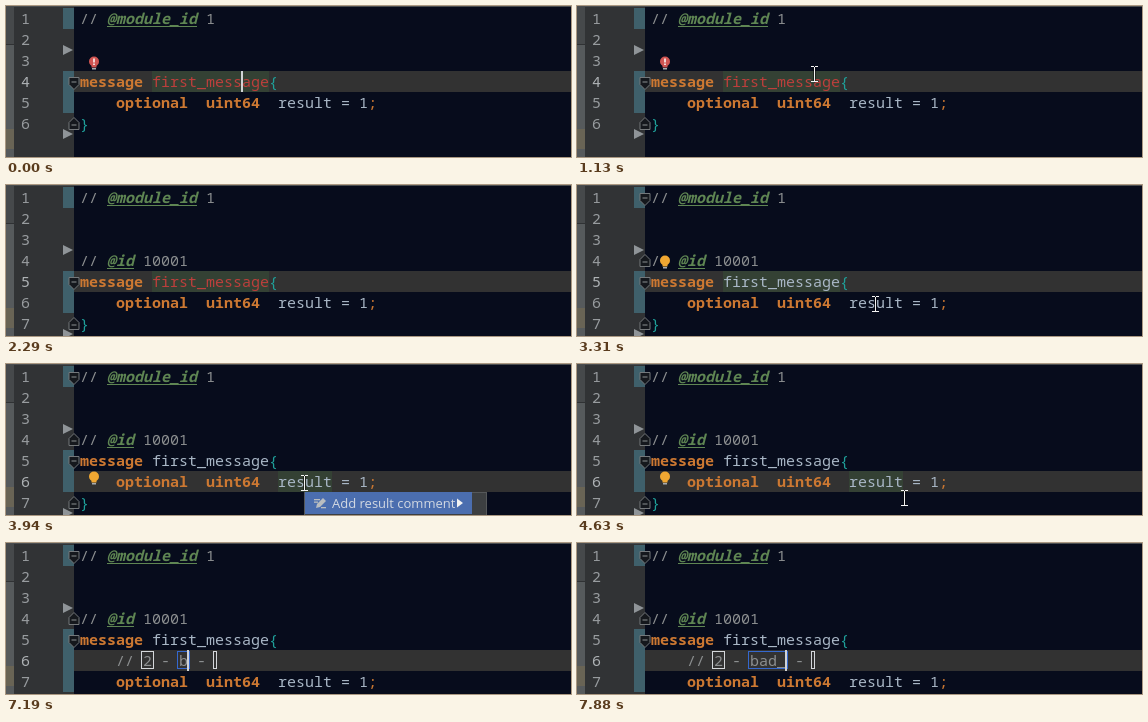
Recreate the animation shown at these times as an HTML page with a canvas. Size 565x151 px, loop 8 s.

```html
<!DOCTYPE html>
<html lang="en">
<head>
<meta charset="utf-8">
<title>Editor quick fixes</title>
<style>
html, body { margin: 0; width: 565px; height: 151px; overflow: hidden; background: #070c1c; }
canvas { display: block; }
</style>
</head>
<body>
<canvas id="stage" width="565" height="151"></canvas>
<script>
const ctx = document.getElementById('stage').getContext('2d');
const LOOP = 8000, CH = 9, ROW = 21, LEFT = 74;
const MONO = '15px "Noto Sans Mono", "DejaVu Sans Mono", monospace';
const UI = '13px "Open Sans", "Noto Sans", sans-serif';
const HINT = '10.5px "Noto Sans CJK SC", "Noto Sans CJK", sans-serif';
const C = {
  bg: '#070c1c', gutter: '#313335', vcs: '#3f606b', row: '#323232',
  num: '#989c9f', numOn: '#aeb2b5', text: '#a9b7c6', comment: '#8c8f90',
  tag: '#5f8653', key: '#cc7832', error: '#bc3f3c', brace: '#1fa09a',
  use: '#344134', menu: '#3c3f41', pick: '#4b6eaf', label: '#c3c6c8',
  bulb: '#f0a732', alert: '#d05552'
};

const rowTop = n => 2 + ROW * (n - 1);
const within = (t, a, b) => t >= a && t < b;

function box(x, y, w, h, color) {
  ctx.fillStyle = color;
  ctx.fillRect(x, y, w, h);
}

function write(str, x, y, color, font) {
  ctx.font = font;
  ctx.fillStyle = color;
  ctx.fillText(str, x, y);
}

function shape(points, fill, stroke) {
  ctx.beginPath();
  points.forEach(([x, y]) => ctx.lineTo(x, y));
  ctx.closePath();
  if (fill) { ctx.fillStyle = fill; ctx.fill(); }
  if (stroke) { ctx.strokeStyle = stroke; ctx.lineWidth = 1; ctx.stroke(); }
}

function disc(x, y, r, color) {
  ctx.beginPath();
  ctx.arc(x, y, r, 0, Math.PI * 2);
  ctx.fillStyle = color;
  ctx.fill();
}

// Writes on the character grid and returns the next free x.
function code(str, x, n, color, style = '') {
  write(str, x, rowTop(n) + 16, color, style + MONO);
  return x + str.length * CH;
}

function annotation(n, tag, value) {
  const x = code('// ', LEFT, n, C.comment);
  const end = code(tag, x, n, C.tag, 'italic bold ');
  box(x, rowTop(n) + 18, end - x, 1, C.tag);
  code(' ' + value, end, n, C.comment);
}

function header(n, color) {
  let x = code('message ', LEFT, n, C.key, 'bold ');
  x = code('first_message', x, n, color);
  code('{', x, n, C.brace);
}

function field(n) {
  code('optional', 110, n, C.key, 'bold ');
  code('uint64', 200, n, C.key, 'bold ');
  const x = code('result = 1', 272, n, C.text);
  code(';', x, n, C.key);
}

function fold(n, up) {
  const y = rowTop(n) + 11.5, s = up ? -1 : 1;
  const pts = [[-5, -5], [5, -5], [5, 2], [0, 7], [-5, 2]];
  shape(pts.map(([a, b]) => [68 + a, y + b * s]), '#15181d', '#74787b');
  box(65.5, y - 0.5 - s * 0.5, 5, 1, '#8b8f92');
}

function deletion(y) {
  shape([[57, y - 5], [67, y], [57, y + 5]], '#8f9498');
}

function bulb(x, y, alert) {
  const color = alert ? C.alert : C.bulb;
  disc(x, y - 1.5, 5, color);
  box(x - 2.5, y + 1.5, 5, 3, color);
  box(x - 2, y + 5, 4, 1.5, '#a7abae');
  if (alert) {
    box(x - 0.75, y - 4.5, 1.5, 4, '#fff');
    box(x - 0.75, y + 0.5, 1.5, 1.5, '#fff');
  }
}

function pencil(x, y) {
  shape([[x - 3, y + 1], [x + 3, y - 5], [x + 6, y - 2], [x, y + 4], [x - 4, y + 5]], '#b9bdc0');
  box(x - 6, y - 4, 6, 1.3, '#b9bdc0');
  box(x - 6, y - 1.5, 4, 1.3, '#b9bdc0');
  box(x + 1, y + 4, 5, 1.3, '#b9bdc0');
}

function option(x, y, w, label, arrow, picked, icon) {
  if (picked) box(x + 1, y - 11, w - 2, 22, C.pick);
  icon(x + 16, y);
  write(label, x + 28, y + 4.5, picked ? '#d3d9e2' : C.label, UI);
  shape([[arrow, y - 4.5], [arrow + 6, y], [arrow, y + 4.5]], '#f2f2f2');
}

function panel(x, y, w, h) {
  box(x, y, w, h, '#55585a');
  box(x + 1, y + 1, w - 2, h - 2, C.menu);
}

function messageMenu() {
  panel(235, 85, 167, 63);
  option(235, 97, 167, 'Add id for message', 385, true, (x, y) => bulb(x, y, true));
  option(235, 119, 167, 'Add route', 385, false, pencil);
  box(236, 130, 165, 1, '#505355');
  box(236, 131, 165, 16, '#414446');
  write('按 Ctrl+Shift+I 打开预览', 241, 143, '#85898c', HINT);
}

function resultMenu() {
  panel(298, 128, 183, 30);
  option(298, 139, 169, 'Add result comment', 451, true, pencil);
}

function caret(x, n) {
  box(x - 1, rowTop(n), 2, ROW, '#d0d3d6');
}

function slot(x, n, len, active) {
  ctx.strokeStyle = active ? '#3468cf' : '#d4d7da';
  ctx.lineWidth = 1;
  ctx.strokeRect(x - 1.5, rowTop(n) + 1.5, len * CH + 3, 17);
}

function template(t, n) {
  const typed = 'bad_'.slice(0, [7190, 7270, 7420, 7880].filter(k => t >= k).length);
  const first = t < 6640;
  if (first) box(136, rowTop(n) + 2, CH + 1, 17, '#21488f');
  code('// ', 110, n, C.comment);
  code('2', 137, n, first ? '#a9b4c2' : C.comment);
  code('-', 155, n, C.comment);
  const end = code(typed, 173, n, C.comment);
  code('-', end + CH, n, C.comment);
  slot(137, n, 1, first);
  slot(173, n, typed.length, !first);
  slot(end + 3 * CH, n, 0, false);
  if (!first) caret(end, n);
  else if (!within(t, 5720, 6270)) caret(146, n);
}

function gutter(current, changed, lastNumber) {
  box(0, 0, 8, 151, '#565a5c');
  box(0, 0, 8, 38, '#46494b');
  box(0, 38, 8, 1, '#303234');
  box(0, 123, 8, 20, '#696455');
  box(8, 0, 60, 151, C.gutter);
  box(57, 2, 11, ROW, C.vcs);
  box(57, rowTop(changed[0]), 11, ROW * (changed[1] - changed[0] + 1), C.vcs);
  for (let n = 1; n <= lastNumber; n++) code(String(n), 15, n, n === current ? C.numOn : C.num);
}

function editor(t) {
  const added = t >= 2290, parsed = t >= 2610, noted = t >= 4710;
  const current = !added ? 4 : t < 3620 ? 5 : 6;
  const head = added ? 5 : 4;
  const body = noted ? 7 : head + 1;

  box(0, 0, 565, 151, C.bg);
  gutter(current, [head, body], added ? 7 : 6);
  box(0, 0, 565, 1, '#4b4e50');
  box(68, rowTop(current), 497, ROW, C.row);
  if (t < 3940) box(146, rowTop(head), 117, ROW, C.use);
  else if (t < 5020) box(272, rowTop(body), 54, ROW, C.use);

  annotation(1, '@module_id', '1');
  if (added) annotation(4, '@id', '10001');
  header(head, parsed ? C.text : C.error);
  field(body);
  if (noted) template(t, 6);
  else code('}', LEFT, body + 1, C.brace);

  deletion(added ? 65 : 44);
  if (!noted) deletion(added ? 149 : 128);
  if (parsed) { fold(1); fold(4, true); }
  fold(head);
  if (!noted) fold(body + 1, true);

  if (!added) bulb(88, 57, true);
  if (within(t, 3160, 3620)) {
    box(83, 67, 11, 18, C.bg);
    bulb(88, 77);
  }
  if (within(t, 3940, 4710)) bulb(88, 114);

  if (t < 120 || within(t, 660, 1130)) caret(236, 4);
  if (within(t, 3620, 3940)) caret(299, 6);
  if (within(t, 1510, 2290)) messageMenu();
  if (within(t, 3940, 4630)) resultMenu();
}

function beam(x, y) {
  x = Math.round(x); y = Math.round(y);
  box(x - 1, y - 7, 3, 15, 'rgba(0,0,0,.45)');
  box(x, y - 7, 1, 15, '#f4f4f4');
  for (const e of [y - 8, y + 7]) {
    box(x - 3, e, 3, 1, '#f4f4f4');
    box(x + 1, e, 3, 1, '#f4f4f4');
  }
}

function hand(x, y) {
  ctx.save();
  ctx.translate(x, y);
  ctx.lineJoin = 'round';
  shape([[-3, -1], [-2, -3], [0, -3], [1, -1], [1, 5], [3, 4.5], [4, 6], [6, 5.5],
    [7, 7], [9, 7], [9.5, 9], [9.5, 14], [7.5, 17], [7.5, 20.5], [-1, 20.5],
    [-1, 18], [-4, 14], [-6.5, 10], [-5.5, 8.5], [-3, 10]], '#fff', '#20242a');
  for (const k of [1, 4, 7]) box(k, 6, 1, 4, '#3a3f45');
  ctx.restore();
}

const MOVES = [
  { from: 580, to: 1130, steps: 7, a: [305, 109], b: [237, 68] },
  { from: 1840, to: 1920, steps: 2, a: [237, 68], b: [271, 97] },
  { from: 3160, to: 3310, steps: 3, a: [271, 97], b: [298, 119] },
  { from: 4170, to: 4330, steps: 3, a: [298, 119], b: [327, 134] }
];

function pointerAt(t) {
  const i = MOVES.filter(m => t >= m.from).length - 1;
  const { from, to, steps, a, b } = MOVES[i];
  const shift = i ? 1 : 0;
  const k = Math.floor((t - from) / (to - from) * (steps - shift) + 1e-6) + shift;
  const p = Math.min(1, k / steps);
  return a.map((v, j) => v + (b[j] - v) * p);
}

function pointer(t) {
  if (t < 580 || within(t, 2290, 2610) || t >= 7190) return;
  const [x, y] = pointerAt(t);
  if (within(t, 2220, 2290) || within(t, 3540, 3620) || within(t, 4550, 4630)) {
    disc(x - 2, y, 11, 'rgba(218,196,40,.85)');
  }
  const overMenu = within(t, 1840, 2290) && y > 85 || within(t, 4170, 4630) && y > 128;
  (overMenu ? hand : beam)(x, y);
}

const start = performance.now();

function frame() {
  const t = (performance.now() - start) % LOOP;
  editor(t);
  pointer(t);
  requestAnimationFrame(frame);
}

frame();
</script>
</body>
</html>
```
